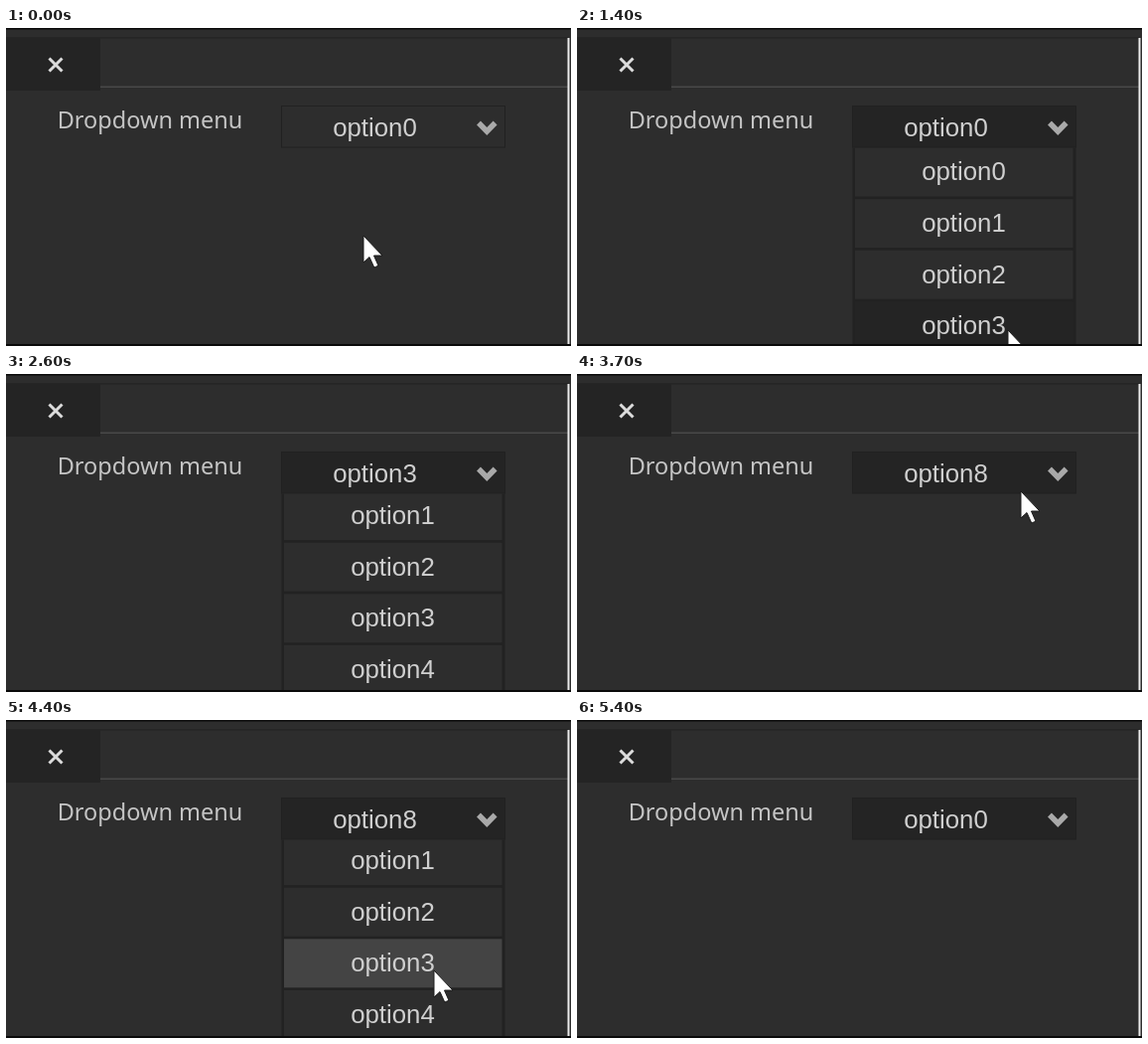
These frames come from a looping animation (569 by 320 pixels, 6100 ms). An HTML page:

```html
<!DOCTYPE html>
<html lang="en">
<head>
<meta charset="utf-8">
<title>Dropdown menu</title>
<style>
  html, body { margin: 0; width: 100%; height: 100%; overflow: hidden; background: #2d2d2d; }
  svg { display: block; width: 100vw; height: 100vh; }
  .label { font: 23.5px "Noto Sans", "Open Sans", sans-serif; fill: #c4c4c4; }
  .option { font: 25.8px "Liberation Sans", Arial, sans-serif; fill: #cfcfcf; text-anchor: middle; }
</style>
</head>
<body>
<svg viewBox="0 0 569 320">
  <defs>
    <clipPath id="list"><rect x="277" y="120.5" width="226" height="198"/></clipPath>
  </defs>
  <rect width="569" height="320" fill="#2d2d2d"/>
  <rect y="9" width="566" height="1.5" fill="#252525"/>
  <rect y="10" width="95" height="53" fill="#242424"/>
  <rect x="95" y="58.5" width="471" height="1.5" fill="#494949"/>
  <path d="M43.5 30.5L56.5 43.5M56.5 30.5L43.5 43.5" stroke="#dcdcdc" stroke-width="3"/>
  <text class="label" x="51.7" y="101">Dropdown menu</text>

  <rect id="header" x="277.5" y="78.5" width="225" height="41.5" stroke="#212121"/>
  <text id="value" class="option" x="371.5" y="108.5"></text>
  <path d="M476 95.5L484.3 104L492.6 95.5" fill="none" stroke="#a9a9a9" stroke-width="5.5"/>

  <g id="menu" clip-path="url(#list)">
    <rect x="277.5" y="119" width="225" height="201" fill="#222"/>
    <g id="rows"></g>
  </g>

  <path id="cursor" d="M0 0V27L6 21.5L10.8 32L15 30.2L10.5 20H19Z" fill="#fff" stroke="#1c1c1c" stroke-width="1"/>

  <rect x="565.5" y="10" width="2" height="308" fill="#ececec"/>
  <rect width="569" height="1.5" fill="#0a0a0a"/>
  <rect y="318" width="569" height="2" fill="#0a0a0a"/>
</svg>
<script>
const LOOP = 6100, TICK = 100;
const PITCH = 51.6, TOP = 120.5, COUNT = 10;
const IDLE = '#2d2d2d', HOVER = '#444444', ACTIVE = '#242424';

// [time, x, y]
const pointer = [
  [0, 360, 209], [300, 411, 101], [600, 411, 101], [1300, 434, 304], [1500, 434, 304],
  [1900, 430, 124], [2000, 430, 106], [2200, 430, 106], [2600, 440, 332],
  [3200, 445, 345], [3700, 447, 118], [3800, 447, 103], [4100, 447, 103],
  [4400, 431, 252], [4700, 428, 247], [5000, 425, 148]
];
const scrolling = [
  [2400, 0], [2600, 54], [2800, 54 + 4 * PITCH], [3200, 54 + 4 * PITCH],
  [3300, 0], [4200, 0], [4400, 55], [4700, 0]
];
const headerFill = [
  [0, IDLE], [300, HOVER], [400, ACTIVE], [2000, HOVER], [2100, ACTIVE], [3800, HOVER], [3900, ACTIVE]
];
const selected = [[0, 0], [1500, 3], [3200, 8], [5300, 0]];
const opened = [[0, false], [600, true], [1500, false], [2200, true], [3200, false], [4100, true], [5300, false]];
const pressed = [[0, false], [1400, true], [1500, false], [5200, true], [5300, false]];

const $ = id => document.getElementById(id);
const [header, value, menu, rowGroup, cursor] = ['header', 'value', 'menu', 'rows', 'cursor'].map($);

function make(tag, attrs, parent) {
  const node = document.createElementNS('http://www.w3.org/2000/svg', tag);
  for (const key in attrs) node.setAttribute(key, attrs[key]);
  return parent.appendChild(node);
}

const rows = Array.from({ length: COUNT }, (_, i) => {
  const y = TOP + i * PITCH;
  const box = make('rect', { x: 280, y, width: 219.5, height: 49 }, rowGroup);
  make('text', { class: 'option', x: 389.5, y: y + 32.8 }, rowGroup).textContent = 'option' + i;
  return box;
});

// Value of the last key reached
function step(keys, t) {
  return keys.filter(k => k[0] <= t).pop()[1];
}

// Linear values between keys
function track(keys, t) {
  const next = keys.findIndex(k => k[0] > t);
  if (next === 0) return keys[0].slice(1);
  if (next < 0) return keys[keys.length - 1].slice(1);
  const a = keys[next - 1], b = keys[next];
  const p = (t - a[0]) / (b[0] - a[0]);
  return a.slice(1).map((v, i) => v + (b[i + 1] - v) * p);
}

function draw(time) {
  const t = Math.floor((time % LOOP) / TICK) * TICK;
  const [x, y] = track(pointer, t);
  const [scroll] = track(scrolling, t);

  header.setAttribute('fill', step(headerFill, t));
  value.textContent = 'option' + step(selected, t);

  menu.style.display = step(opened, t) ? '' : 'none';
  rowGroup.setAttribute('transform', `translate(0 ${-scroll})`);
  const over = y < TOP ? -1 : Math.floor((y - TOP + scroll) / PITCH);
  const overFill = step(pressed, t) ? ACTIVE : HOVER;
  rows.forEach((box, i) => box.setAttribute('fill', i === over ? overFill : IDLE));

  cursor.setAttribute('transform', `translate(${x} ${y})`);
  cursor.style.display = t < 5400 ? '' : 'none';
}

const start = performance.now();
function frame() {
  draw(performance.now() - start);
  requestAnimationFrame(frame);
}
frame();
</script>
</body>
</html>
```
